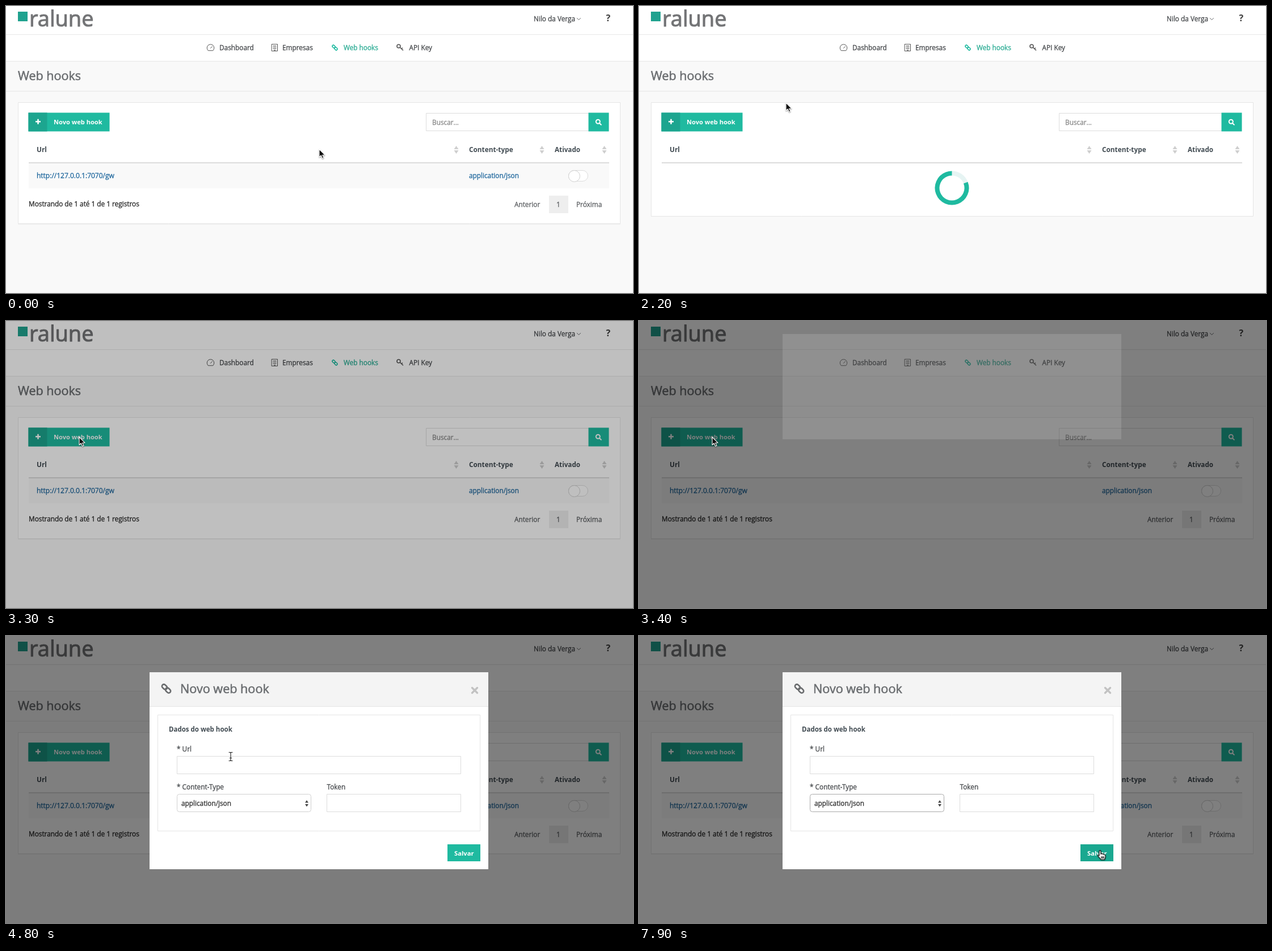
An HTML page with a canvas that plays this animation: 1105x507 px, repeating every 8 s.

```html
<!DOCTYPE html>
<html lang="pt">
<head>
<meta charset="utf-8">
<title>Web hooks</title>
<style>
  html, body { margin: 0; height: 100%; overflow: hidden; background: #f9f9f9; }
  canvas { display: block; }
</style>
</head>
<body>
<canvas width="1105" height="507"></canvas>
<script>
const c = document.querySelector('canvas').getContext('2d');
const TEAL = '#1fbaa0', GREY = '#606366', LINE = '#e5e5e5', DARK = '#414b52', BLUE = '#236a9f';
const LOOP = 8000, STEP = 100;

// Pointer hotspot over time: [ms, x, y]
const PATH = [
  [0, 552, 253], [200, 552, 253], [800, 612, 76], [1400, 612, 76], [2200, 259, 171],
  [2700, 129, 205], [3700, 129, 205], [4500, 392, 213], [4800, 396, 213], [5000, 396, 213],
  [5700, 474, 296], [6200, 474, 296], [6500, 474, 313.5], [6800, 474, 313.5], [7000, 474, 296],
  [7200, 474, 296], [7700, 812, 379], [LOOP, 812, 379]
];

const clamp = v => Math.max(0, Math.min(1, v));

function rect(x, y, w, h, color) {
  c.fillStyle = color;
  c.fillRect(x, y, w, h);
}

// Button face with a soft half-pixel rim
function face(x, y, w, h, color) {
  rect(x - .5, y - .5, w + 1, h + 1, color);
}

function box(x, y, w, h, fill = '#fff', line = LINE, radius = 0) {
  c.beginPath();
  c.roundRect(x + .5, y + .5, w - 1, h - 1, radius);
  c.fillStyle = fill;
  c.fill();
  c.strokeStyle = line;
  c.lineWidth = 1;
  c.stroke();
}

// Regular text gets a hairline outline for a medium weight
function text(str, x, y, color = '#484b4e', size = 11.8, weight = 400) {
  c.font = `${weight} ${size}px "Open Sans", "Noto Sans", sans-serif`;
  c.fillStyle = c.strokeStyle = color;
  c.fillText(str, x, y);
  if (weight > 400) return;
  c.lineWidth = size * .028;
  c.lineJoin = 'round';
  c.strokeText(str, x, y);
}

function shape(d, x, y, fill, stroke, width = 1) {
  const p = new Path2D(d);
  c.save();
  c.translate(x, y);
  c.lineJoin = c.lineCap = 'round';
  if (fill) { c.fillStyle = fill; c.fill(p); }
  if (stroke) { c.strokeStyle = stroke; c.lineWidth = width; c.stroke(p); }
  c.restore();
}

function chain(x, y, scale, color) {
  c.save();
  c.translate(x, y);
  c.rotate(Math.PI / 4);
  c.scale(scale, scale);
  c.strokeStyle = color;
  c.lineWidth = 1.8;
  for (const dx of [-6.5, -.5]) {
    c.beginPath();
    c.roundRect(dx, -2.3, 7, 4.6, 2.3);
    c.stroke();
  }
  c.restore();
}

function ring(t) {
  const a = (t - 2200) / 1000 * 2 * Math.PI - Math.PI / 2;
  c.lineWidth = 8;
  for (const [from, to, color] of [[0, 1.2, '#e6f4f3'], [1.2, 2 * Math.PI, TEAL]]) {
    c.beginPath();
    c.arc(551.5, 321.5, 26, a + from, a + to);
    c.strokeStyle = color;
    c.stroke();
  }
}

function header(overLink) {
  rect(0, 0, 1105, 97, '#fff');
  for (const y of [50, 97, 150]) rect(0, y, 1105, 1, '#e7e7e7');
  rect(21, 10, 17, 17, '#20a28f');
  text('ralune', 41, 36, '#737476', 38);
  text('Nilo da Verga', 930, 27);
  shape('M0 0L3 3L6 0', 1006.5, 21.5, null, GREY);
  text('?', 1057.5, 26.5, '#3c3c3c', 16, 700);

  shape('M-4.5 5A6.3 6.3 0 1 1 4.5 5ZM0 1L3 -2', 360.5, 73.5, null, '#555');
  text('Dashboard', 376, 78);
  shape('M0 0H10V12H0ZM2.5 3H7.5M2.5 5.5H7.5M2.5 8H7.5M4 12V10.5H6V12', 468.5, 67.5, null, '#555');
  text('Empresas', 487, 78);
  chain(579.5, 73.5, .85, TEAL);
  text('Web hooks', 595, 78, overLink ? '#1c9d88' : '#2bac94');
  shape('M3 0A3 3 0 1 1 -3 0A3 3 0 1 1 3 0M2.2 2L7.5 7M5 4.7L6.5 3.2', 692, 71, null, '#555', 1.6);
  text('API Key', 710.5, 78);
  text('Web hooks', 21, 131, '#6b6e71', 21.5);
}

function newButton(state) {
  const [left, main] = {
    idle: ['#1ca58f', TEAL], hover: ['#18957f', '#1aa68e'], down: ['#28733a', '#318539']
  }[state];
  face(40, 189, 142, 32, main);
  face(40, 189, 32, 32, left);
  if (state === 'down') {
    c.strokeStyle = '#1c4a2a';
    c.lineWidth = 1;
    c.strokeRect(40.5, 189.5, 141, 32);
  }
  rect(52, 203, 9, 2.5, '#fff');
  rect(55.25, 199.75, 2.5, 9, '#fff');
  text('Novo web hook', 84, 209, '#fff', 11.1, 700);
}

function list(t, loading, state) {
  rect(21, 385, 1062, 1, loading ? '#f9f9f9' : '#eee');
  box(21, 170, 1062, loading ? 202 : 215);
  newButton(state);
  box(740, 189, 288, 32, '#fff', '#dcdcdc');
  text('Buscar...', 751, 210, '#8a8a8a');
  face(1027, 189, 35, 32, TEAL);
  shape('M3.5 0A3.5 3.5 0 1 1 -3.5 0A3.5 3.5 0 1 1 3.5 0M2.6 2.6L5.5 5.5', 1043.3, 204.3, null, '#fff', 2);

  text('Url', 54, 258, DARK, 11.8, 700);
  text('Content-type', 816, 258, DARK, 11.8, 700);
  text('Ativado', 967, 258, DARK, 11.7, 700);
  for (const x of [793, 944, 1054]) shape('M-4 -1L0 -7L4 -1ZM-4 1L0 7L4 1Z', x + .5, 254, '#cfcfcf');
  rect(40, 276, 1023, 2, '#dcdcdc');
  if (loading) return ring(t);

  rect(40, 278, 1023, 44, '#f9f9f9');
  text('http://127.0.0.1:7070/gw', 54, 304, BLUE, 12);
  text('application/json', 816, 304, BLUE);
  box(991, 290, 35, 20, '#fff', '#dcdcdc', 10);
  box(991, 290, 21, 21, '#fff', '#cfcfcf', 10);
  text('Mostrando de 1 até 1 de 1 registros', 40, 354, '#2b2b2b');
  text('Anterior', 896, 355, GREY);
  rect(957, 335, 34, 31, '#eee');
  text('1', 970, 355, GREY);
  text('Próxima', 1005, 355, GREY);
}

function dialog(t, overSave) {
  const p = clamp((t - 3380) / 300);
  const loaded = t >= 3900;
  const y = Math.round(64 - 46.5 * (1 - p) ** 2);
  c.globalAlpha = clamp((t - 3380) / 150);
  rect(253, y, 597, loaded ? 348 : 186, '#fff');
  c.globalAlpha = 1;
  if (!loaded) return;

  rect(253, 64, 597, 60, '#f4f4f4');
  rect(253, 124, 597, 1, LINE);
  chain(282.5, 93, 1.45, '#6a6c6e');
  text('Novo web hook', 307, 101, '#6b6e71', 21.6);
  shape('M-4.5 -4.5L4.5 4.5M4.5 -4.5L-4.5 4.5', 826, 96, null, '#c2c2c2', 3.4);
  box(267, 139, 569, 206);
  text('Dados do web hook', 287, 169, DARK, 11.5, 700);
  text('* Url', 301, 204);
  box(301, 212, 501, 32, '#fff', '#dcdcdc');
  text('* Content-Type', 301, 271);
  text('Token', 565.5, 271);
  box(301, 279, 237, 32, '#fff', t >= 5900 ? '#a9a9a9' : '#d0d0d0', 4);
  text('application/json', 309, 300, '#333');
  shape('M-3 -1L0 -5.5L3 -1ZM-3 1.5L0 6L3 1.5Z', 530, 295.5, '#444');
  box(565, 279, 237, 32, '#fff', '#dcdcdc');
  rect(778, 368, 58, 30, overSave ? '#1aa890' : TEAL);
  text('Salvar', 790, 388, '#fff', 11.2, 700);
}

function dropdown(y) {
  c.save();
  c.shadowColor = 'rgba(0,0,0,.45)';
  c.shadowBlur = 7;
  c.shadowOffsetY = 3;
  c.beginPath();
  c.roundRect(291.5, 282, 237, 41.5, 4);
  c.fillStyle = '#f8f8f8';
  c.fill();
  c.restore();
  const second = y > 303;
  rect(291.5, second ? 303 : 286, 237, 17, '#0b60e4');
  shape('M0 3L2.5 6.5L7 -2', 297.5, 291.5, null, second ? '#222' : '#fff', 1.6);
  text('application/json', 311, 298, second ? '#222' : '#fff', 12);
  text('application/xml', 311, 315, second ? '#fff' : '#222', 12);
}

function pointerAt(t) {
  const i = PATH.findIndex(k => k[0] > t);
  const [t0, x0, y0] = PATH[i - 1], [t1, x1, y1] = PATH[i];
  const p = (t - t0) / (t1 - t0), e = p * p * (3 - 2 * p);
  return [x0 + (x1 - x0) * e, y0 + (y1 - y0) * e];
}

const CURSORS = {
  arrow: ['M0 0V14L3.2 11L5.6 16.3L8 15.2L5.7 10.2H10Z', '#111', '#fff'],
  hand: ['M-1 1C-1 -.5 2 -.5 2 1V6L3 5.2L5 6L6 5.8L7.5 7L9 7.2L10 8.5V12L8.5 16H2.5L-1.5 11.5L-3.5 9C-3.5 7.5 -2 7.5 -1 9ZM3 10.5V13.5M5 10.5V13.5M7 10.5V13.5', '#fff', '#111'],
  beam: ['M-3 -7.5H-1L0 -6.5L1 -7.5H3M0 -6.5V6.5M-3 7.5H-1L0 6.5L1 7.5H3M-1.5 2.5H1.5', null, '#222']
};

function pointer(kind, x, y) {
  const [d, fill, stroke] = CURSORS[kind];
  c.save();
  if (kind !== 'beam') {
    c.shadowColor = 'rgba(0,0,0,.35)';
    c.shadowBlur = 2;
    c.shadowOffsetY = 1;
  }
  shape(d, x, y, fill, stroke, 1.1);
  c.restore();
}

function draw(t) {
  const [x, y] = pointerAt(t);
  const over = (x0, y0, x1, y1) => x >= x0 && x <= x1 && y >= y0 && y <= y1;
  const shaded = t >= 3300;
  const overLink = !shaded && over(570, 64, 658, 84);
  const overNew = !shaded && over(40, 189, 182, 222);
  const overSave = t >= 3900 && over(778, 368, 836, 398);
  const overUrl = t >= 3900 && over(301, 212, 802, 244);

  rect(0, 0, 1105, 507, '#f9f9f9');
  header(overLink);
  list(t, t >= 1400 && t < 2500, !overNew ? 'idle' : t >= 3100 ? 'down' : 'hover');
  if (shaded) {
    rect(0, 0, 1105, 507, `rgba(0,0,0,${.5 * clamp((t - 3225) / 150)})`);
    dialog(t, overSave);
  }
  if (t >= 6000 && t < 7100) dropdown(y);
  pointer(overLink || overNew || overSave ? 'hand' : overUrl ? 'beam' : 'arrow', x, y);
}

function tick() {
  draw(Math.floor(performance.now() % LOOP / STEP) * STEP);
  requestAnimationFrame(tick);
}
tick();
</script>
</body>
</html>
```
